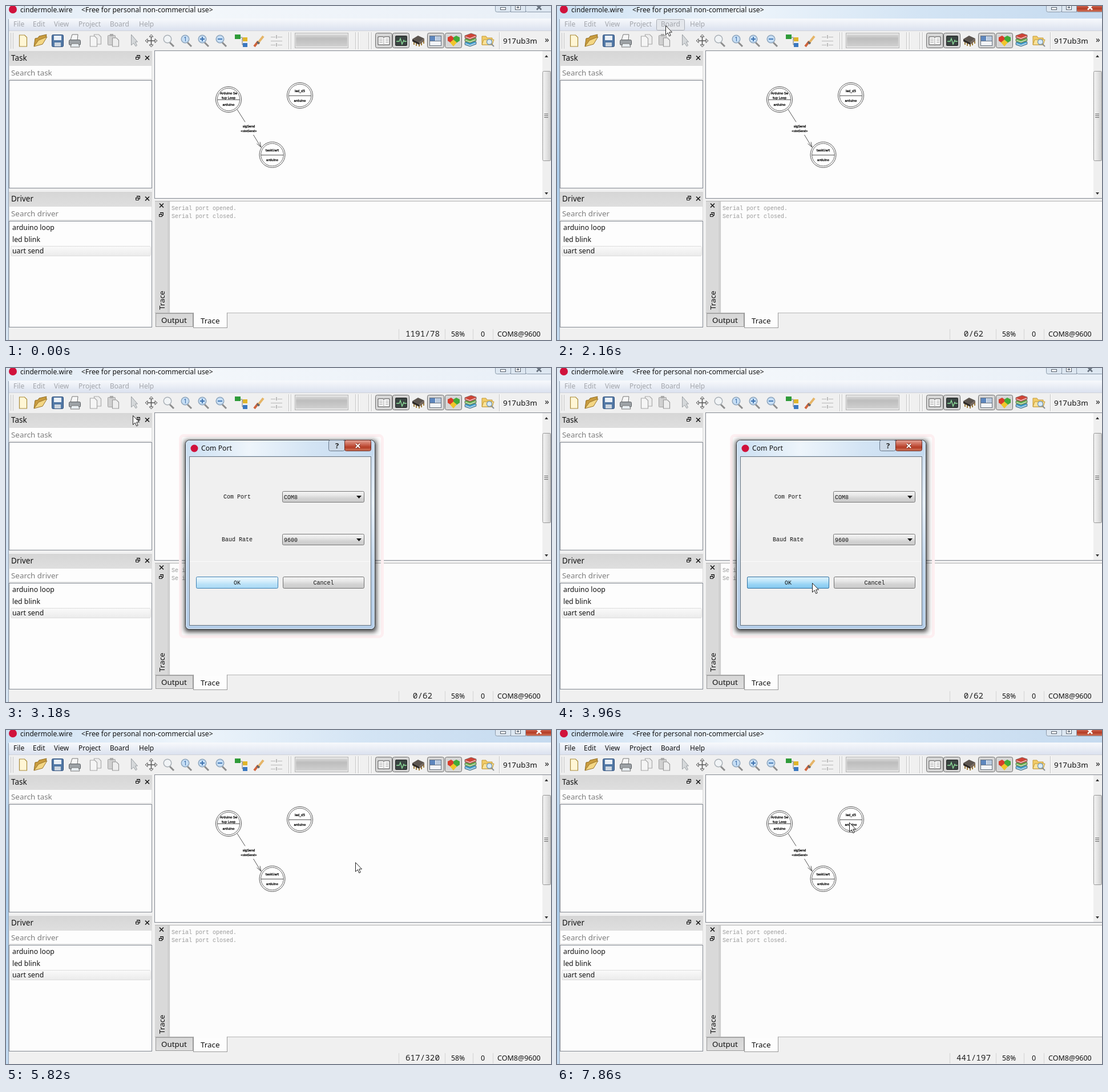
Recreate the animation shown at these times as an HTML page. Size 955 by 586 pixels, loop 8000 ms.

```html
<!DOCTYPE html>
<html lang="en">
<head>
<meta charset="utf-8">
<title>Wiring editor</title>
<style>
html, body { margin: 0; width: 100%; height: 100%; overflow: hidden; background: #f0f0f0; }
svg { display: block; }
text { font-family: "Noto Sans", "Open Sans", sans-serif; white-space: pre; }
.mono { font-family: "Liberation Mono", monospace; }
.tiny { font-family: "DejaVu Sans", sans-serif; stroke: #000; stroke-width: .3px; }
.wide { font-family: "Noto Sans Mono", monospace; }
</style>
</head>
<body>
<svg id="stage" width="955" height="586" viewBox="0 0 955 586"></svg>
<script>
const rect = (x, y, w, h, fill, stroke = 'none', rx = 0) => stroke === 'none'
  ? `<rect x="${x}" y="${y}" width="${w}" height="${h}" fill="${fill}" rx="${rx}"/>`
  : `<rect x="${x + .5}" y="${y + .5}" width="${w - 1}" height="${h - 1}" fill="${fill}" stroke="${stroke}" rx="${rx}"/>`;
const path = (d, stroke = '#333', width = 1, fill = 'none') =>
  `<path d="${d}" fill="${fill}" stroke="${stroke}" stroke-width="${width}"/>`;
const fill = (d, color) => path(d, 'none', 0, color);
const disc = (x, y, r, color, stroke = 'none', width = 1) =>
  `<circle cx="${x}" cy="${y}" r="${r}" fill="${color}" stroke="${stroke}" stroke-width="${width}"/>`;
const text = (x, y, s, size = 12, color = '#111', more = '') =>
  `<text x="${x}" y="${y}" font-size="${size}" fill="${color}" ${more}>${s.replace(/</g, '&lt;')}</text>`;
const group = (id, body, more = '') => `<g id="${id}" ${more}>${body}</g>`;
const shadow = (x, y, w, h, blur, opacity) =>
  `<rect x="${x}" y="${y}" width="${w}" height="${h}" rx="4" opacity="${opacity}" style="filter:blur(${blur}px)"/>`;
const grad = (id, colors, across) =>
  `<linearGradient id="${id}" x2="${across ? 1 : 0}" y2="${across ? 0 : 1}">` +
  colors.map((c, i) => `<stop offset="${i / (colors.length - 1)}" stop-color="${c}"/>`).join('') + '</linearGradient>';
const mid = 'text-anchor="middle"';
const mono = 'class="mono"';

const defs = '<defs>' +
  grad('glass', ['#dfeaf5', '#f3f7fb', '#eef3f9', '#e8eff7'], true) +
  grad('liveGlass', ['#cbdff2', '#eef5fb', '#d3e4f4', '#c5daef'], true) +
  grad('side', ['#dfe9f4', '#d0e0f0', '#d6e4f2']) +
  grad('liveSide', ['#cfe2f4', '#aacbea', '#c3daf0']) +
  grad('bar', ['#f7f9fc', '#e9edf5', '#d9e0ee']) +
  grad('head', ['#d6d6d6', '#dedede']) +
  grad('btn', ['#f4f4f4', '#e9e9e9', '#d2d2d2', '#cbcbcb']) +
  grad('blue', ['#eef8fe', '#d9f0fc', '#b9e1f8', '#aad9f4']) +
  grad('hot', ['#dcf1fc', '#c2e7fa', '#98d4f5', '#84c7ee']) +
  grad('red', ['#e3a497', '#d0705e', '#b53c25', '#cf7a60']) +
  grad('gauge', ['#d8d8d8', '#bdbdbd', '#c6c6c6', '#d0d0d0']) +
  grad('row', ['#fafafa', '#ebebeb']) +
  grad('thumb', ['#f4f4f4', '#e3e3e3', '#cdcdcd'], true) +
  grad('frame', ['#c7d9ec', '#e6eff8', '#bfd4ea', '#b4cde8']) + '</defs>';

const floatIcon = (x, y) => path(`M${x + 2.5} ${y + 2}v-1.500h5v5h-2M${x + .5} ${y + 3.5}h5v4h-5zM${x} ${y + 4}h6M${x + 2} ${y + 1}h6`, '#111');
const cross = (x, y, r = 3.5, color = '#111', w = 1.5) =>
  path(`M${x - r} ${y - r}l${2 * r} ${2 * r}M${x + r} ${y - r}l${-2 * r} ${2 * r}`, color, w);
const arrowDown = (x, y, up) => fill(`M${x - 3} ${y}h6l-3 ${up ? -4 : 4}z`, '#333');

// Toolbar icons
const page = (x, y, w, h, color, edge) => path(`M${x} ${y}h${w - 4}l4 4v${h - 4}h${-w}z`, edge, 1.2, color);
const lens = (x, mark) => path(`M${x + 12} 64l7 7`, '#8d8d8d', 3) +
  disc(x + 8, 58, 6.8, mark ? '#c6def5' : '#f1f4f6', mark ? '#8fa6bd' : '#a9b0b6', 1.5) +
  (mark === '1' ? text(x + 8, 62, '1', 10, '#235a9c', mid) : mark ? path(mark, '#3c71ae', 1.8) : '');
const folder = (x, y, s) => `<g transform="translate(${x} ${y}) scale(${s})">` +
  path('M1 17V2h7l2 3h9v12z', '#c49a36', 1, '#f2cc68') + path('M1 17l3-9h18l-3 9z', '#c49a36', 1, '#fae39a') + '</g>';
const foundFolder = (x, y, s) => folder(x, y, s) + disc(x + 14 * s, y + 12 * s, 4.5 * s, '#d7ebfa', '#7896ac', 1.4) +
  path(`M${x + 17 * s} ${y + 15 * s}l${5 * s} ${5 * s}`, '#8a8f92', 2);
const pressed = x => rect(x, 47, 30, 27, '#d6d6d6', '#6c6c6c', 3);
const split = x => path(`M${x + .5} 46v30`, '#c3c3c3') + path(`M${x + 1.500} 46v30`, '#fff');
const books = ['#3c9bd0', '#62ac48', '#cf4437'].map((c, i) => {
  const y = 64 - i * 6;
  return path(`M804 ${y}l11-4 9 3v4l-11 4-9-3z`, '#666', .7, c) + path(`M805 ${y + 2}l8 3 10-4`, '#eee', 1.2);
}).join('');

const toolbar = rect(5, 44, 950, 34, '#f0f0f0') + path('M5 43.500H955', '#d0d3da') +
  path('M8.500 47v28M12.500 47v28', '#c9c9c9', 1) +
  page(23.5, 51, 13, 20, '#fff6d5', '#a98b3a') +
  path('M49 71l2-14 5-1 2-3 13-3-1 5z', '#8e6b22', 1, '#c99c3f') + path('M49 71l8-11 15-6-8 13z', '#9a752a', 1, '#f3d684') +
  rect(80, 50, 21, 22, '#5278a5', '#2f4f7c', 2) + rect(84, 52, 13, 8, '#e9eff6') + rect(85, 64, 11, 7, '#cdd6e0') +
  path('M113 60l3-10h10l-1 10', '#777', 1, '#f7f7f7') + rect(110, 59, 21, 10, '#9da2a6', '#595d61', 2) +
  path('M113 72l2-6h12l2 6z', '#777', 1, '#e8eef2') +
  page(154.5, 50, 12, 17, '#eee', '#aaa') + page(147.5, 53, 12, 18, '#f5f5f5', '#a6a6a6') +
  rect(178, 51, 14, 18, '#d0d0d0', '#a0a0a0', 1) + rect(182, 49, 6, 4, '#aaa') + page(186.5, 56, 11, 15, '#eee', '#999') +
  path('M219.500 50v19l4-4 4 6 2-2-3-6h4z', '#9a9fa3', 1, '#d5d8da') +
  path('M254.500 53v16M246 61h17', '#555', 1.5) +
  path('M251 54l3.500-4 3.500 4zM251 68l3.500 4 3.500-4zM248 57.500l-4 3.500 4 3.500zM261 57.500l4 3.500-4 3.500z', '#555', 1, '#eee') +
  lens(275) + lens(306, '1') + lens(336, 'M340 58h8M344 54v8') + lens(367, 'M371 58h8') +
  path('M410 55h4v13h4M414 58h4', '#777') + rect(401, 50, 10, 8, '#2f9b39') + rect(415, 55, 8, 7, '#e0b52a') + rect(415, 65, 8, 7, '#3b78c0') +
  path('M435 71l7-9', '#d0643b', 4) + path('M440 63l4 3', '#666', 4) + path('M443 63l8-10', '#e5b568', 4) +
  path('M464 54.500h8M476 54.500h8M464 61.500h20M464 68.500h8M476 68.500h8', '#b8b8b8') + path('M474 51v6M474 65v6', '#bbb', 2) +
  split(495) + split(499) + rect(506, 47, 94, 27, '#e8e8e8', '#b3b3b3') + rect(508, 50, 90, 21, 'url(#gauge)') +
  [612, 617, 635, 640].map(split).join('') +
  pressed(647) + path('M652 54h9l1 1 1-1h9v14h-9l-1 1-1-1h-9z', '#444', 1, '#fff') + path('M662 55v14M654 58h6M654 61h6M654 64h6M665 58h5M665 61h5M665 64h5', '#999') +
  pressed(677) + rect(682, 52, 21, 18, '#3a4442', '#222', 1) + path('M684 62h5l2-5 3 10 3-7 1 2h4', '#8fe09c', 1.3) +
  path('M715 63v5M719 65v5M724 66v5M728 64v5M732 61v5', '#9c7b3a', 2) + fill('M712 58l10-6 11 5-9 7z', '#5c554f') + fill('M712 58l12 6v4l-12-6z', '#2f2a27') + fill('M724 64l9-7v4l-9 7z', '#75665a') +
  pressed(738) + rect(742, 52, 21, 18, '#f2f4f7', '#687381') + rect(743, 53, 9, 8, '#5d86bd') + rect(753, 53, 9, 8, '#b9c9dd') + path('M742 61.500h21', '#687381') +
  pressed(769) + fill('M774 55l6-3 4 3v8l-4 2-6-4z', '#d83d2b') + fill('M784 55l5-3 6 3v6l-6 4-5-2z', '#42aa3a') + fill('M778 64l6-5 6 5-6 7z', '#f0c52c') +
  books + foundFolder(833, 51, 1) + split(864) + text(871, 66, '917ub3m', 13.4) + text(944, 64, '»', 15);

// Dock panels
const dock = (y, name, bottom) => rect(5, y, 251, 25, 'url(#head)') + text(9, y + 17, name, 13.5) +
  floatIcon(227, y + 7) + cross(247.5, y + 12) +
  rect(5, y + 25, 251, 25, '#fdfdfd', '#dcdcdc') + text(9, y + 43, 'Search ' + name.toLowerCase(), 13.4, '#7d7d7d') +
  rect(5, y + 51, 251, bottom - y - 51, '#fdfdfd', '#828790');

const label = (x, y, s, size = 5.5) => text(x, y, s, size, '#000', `class="tiny" ${mid}`);
const node = (x, y, lines) => disc(x, y, 22.5, '#fff', '#555') + disc(x, y, 19.8, '#fff', '#666') +
  path(`M${x - 19.5} ${y + .5}h39`, '#555') +
  lines.map((s, i) => label(x, y + (lines.length > 1 ? -9 + i * 8 : -6), s)).join('') + label(x, y + 10.500, 'arduino');

const scene = rect(260, 78, 695, 260, '#fdfdfd', '#828790') + rect(940, 79, 15, 258, '#efefef') +
  rect(940, 114, 15, 158, 'url(#thumb)', '#979797', 2) + path('M943 189.500h7M943 192.500h7M943 195.500h7', '#666') +
  arrowDown(947, 90, true) + arrowDown(947, 327) +
  path('M405 181.500l14 22M433.500 226l13 21.500M439.500 241.500l7.500 6.500-2-9.500', '#555') +
  label(425.500, 213, 'sigSend') + label(425.500, 221, '<slotSend>', 4.8) +
  node(390, 164, ['Arduino Se', 'tup Loop']) + node(515, 157, ['led_d5']) + node(466.500, 261, ['taskUart']);

const trace = rect(261, 342, 23, 196, '#d9d9d9') + cross(272.5, 350) + floatIcon(268, 362) +
  text(0, 0, 'Trace', 13.3, '#111', 'transform="translate(278 533) rotate(-90)"') +
  rect(286, 342, 669, 196, '#fcfcfc') + path('M261 342.500H955M284.500 342v196M286.500 538V342M261 538.500H955', '#b5b5b5') +
  text(290, 358, 'Serial port opened.', 10, '#999', mono) + text(290, 372, 'Serial port closed.', 10, '#999', mono) +
  rect(262, 539, 66, 24, 'url(#head)', '#999') + text(272, 556, 'Output', 13.4) +
  rect(328, 538, 60, 27, '#fdfdfd', '#999') + rect(329, 537, 58, 3, '#fcfcfc') + text(341, 557, 'Trace', 13.4);

const status = [688, 769, 818, 853].map(x => path(`M${x}.5 567v18`, '#d4d4d4')).join('') +
  text(730, 580, '', 14.3, '#222', `id="pos" class="wide" ${mid}`) + text(780, 580, '58%', 12.2) +
  text(832, 580, '0', 12.5) + text(861, 580, 'COM8@9600', 12.5);

const menus = [['File', 13], ['Edit', 47], ['View', 84], ['Project', 127], ['Board', 182], ['Help', 233]];
const chrome = (id, glass, side, close, ink) => group(id,
  rect(0, 0, 955, 23, `url(#${glass})`) + rect(0, 0, 4, 586, `url(#${side})`) +
  rect(857, -8, 28, 19, '#dde7f1', '#8b99aa', 3) + rect(884, -8, 27, 19, '#dde7f1', '#8b99aa') +
  rect(910, -8, 48, 19, close, '#8b99aa', 3) + rect(866, 2, 10, 5, '#fff', '#56606d') +
  rect(892, -3, 10, 10, '#fff', '#56606d') + rect(895, 1, 4, 3, '#d8e2ec', '#56606d') + cross(934, 2.5, 4, ink, 2.6));
const hoverBox = (id, x, w, paint, edge) => group(id, rect(x, 23, w, 20, paint, edge, 2));

const win = rect(0, 0, 955, 586, '#f0f0f0') +
  chrome('idle', 'glass', 'side', '#dde7f1', '#69737f') + chrome('live', 'liveGlass', 'liveSide', 'url(#red)', '#fff') +
  path('M4.500 23v563', '#8f9eb0') +
  disc(12, 6, 7, '#d0123c') + text(25, 11, 'cindermole.wire', 12.1) + text(132, 11, '<Free for personal non-commercial use>', 12.15) +
  rect(5, 22, 950, 22, 'url(#bar)') +
  hoverBox('overProject', 120, 53, '#e4e7ec', '#a9adb5') + hoverBox('overBoard', 174, 50, '#e4e7ec', '#a9adb5') +
  hoverBox('downBoard', 174, 50, '#cfd2d8', '#6f7378') +
  group('names', menus.map(([s, x]) => `<text x="${x}" y="36" font-size="12">${s}</text>`).join('')) +
  toolbar + dock(79, 'Task', 320) + dock(326, 'Driver', 564) +
  rect(8, 421, 246, 18, 'url(#row)', '#dcdcdc', 2) +
  ['arduino loop', 'led blink', 'uart send'].map((s, i) => text(11, 393 + i * 20.500, s, 12.3)).join('') +
  scene + trace + status;

const redBox = (y, d) => rect(180, y, 15, 15, '#fff', '#e06060') + path(d, '#dc2222', 2);
const menu = group('menu', shadow(178, 48, 170, 124, 1.2, .45) +
  rect(174, 44, 172, 126, '#f2f2f2', '#8f8f8f') + path('M203.500 47v120', '#e8e8e8') +
  group('pick', rect(177, 68, 165, 22, '#e6f0fa', '#aecbe8', 2)) +
  fill('M181 72h13l-5 7v7l-3-2v-5z', '#9c9c9c') +
  redBox(103, 'M183 110.500h8M188 107l4 3.500-4 3.500') + redBox(126, 'M187.500 138v-8M184 133l3.500-4 3.500 4') + foundFolder(180, 148, .7) +
  [['Board Setting...', 61], ['Trace port...', 84], ['Build', 115], ['Upload', 137], ['Explore Source ...', 160]]
    .map(([s, y]) => text(209, y, s, 12.25)).join(''));

const combo = (y, name, value, x) => text(x, y + 13, name, 10, '#111', mono) +
  rect(484, y, 144, 20, 'url(#btn)', '#777', 2) + text(487, y + 13.500, value, 10, '#111', mono) + fill(`M614 ${y + 8}h9l-4.500 5z`, '#111');
const button = (x, w, s, paint, edge) => rect(x, 366, w, 21, paint, edge, 2) + text(x + w / 2, 380, s, 10, '#111', `${mono} ${mid}`);
const dialog = group('dialog', rect(305, 118, 355, 354, 'none', '#fdeff1', 6).replace('/>', ' stroke-width="5"/>') +
  shadow(313, 127, 336, 336, 4, .75) +
  rect(314, 126, 333, 333, 'url(#frame)', '#2c3238', 7) + rect(315, 127, 331, 331, 'none', '#eaf3fb', 6) +
  rect(316, 128, 329, 26, 'url(#liveGlass)', 'none', 5) +
  disc(330, 141, 6.5, '#d0123c') + text(342, 145, 'Com Port', 12.2) +
  rect(565, 126, 29, 20, '#ccd9e7', '#68788a', 3) + text(580, 141, '?', 13, '#222', `${mid} font-weight="bold"`) +
  rect(593, 126, 47, 20, 'url(#red)', '#6b2a22', 3) + cross(616.500, 136.500, 3.5, '#7c2b1e', 4) + cross(616.500, 136.500, 3.5, '#fff', 2.2) +
  rect(321, 155, 319, 297, '#f0f0f0', '#66737f') + path('M322 339.500H639', '#fafafa') +
  combo(216, 'Com Port', 'COM8', 381) + combo(291, 'Baud Rate', '9600', 378) +
  button(333, 144, 'OK', 'url(#blue)', '#3c7fb1') + group('hotOk', button(333, 144, 'OK', 'url(#hot)', '#2f6f9f')) +
  button(485, 143, 'Cancel', 'url(#btn)', '#707070'));

const stage = document.getElementById('stage');
stage.innerHTML = defs + win + menu + dialog +
  group('cursor', path('M.5 .5V16.500L4.200 13 6.700 18.800 9.200 17.700 6.700 12H11.500Z', '#222', 1, '#fff'));
const el = id => document.getElementById(id);
const show = (id, on) => { el(id).style.opacity = +on; };

const track = [
  [60, 928, 93], [120, 804, 89], [180, 561, 109], [240, 386, 116], [300, 306, 114], [360, 271, 99], [420, 261, 85],
  [480, 232, 70], [600, 185, 50], [720, 160, 41], [1020, 160, 41], [1200, 190, 34], [2220, 190, 34],
  [2580, 214, 70], [2880, 222, 83], [3180, 222, 83], [3240, 228, 95], [3480, 360, 300], [3660, 455, 374], [3780, 466, 379],
  [4020, 441, 376], [4500, 441, 376], [4620, 440, 375], [5460, 440, 375], [5520, 456, 368], [5580, 486, 352],
  [5640, 538, 301], [5700, 572, 264], [5760, 598, 239], [5820, 612, 232], [7440, 612, 232], [7560, 607, 231],
  [7620, 594, 227], [7680, 576, 217], [7740, 553, 193], [7800, 533, 184], [7860, 512, 162]
];
function pointer(t) {
  const i = track.findIndex(k => k[0] > t);
  if (i < 0) return track.at(-1).slice(1);
  if (i === 0) return track[0].slice(1);
  const a = track[i - 1], b = track[i], u = (t - a[0]) / (b[0] - a[0]);
  return [1, 2].map(k => Math.round(a[k] + (b[k] - a[k]) * u));
}
const ramp = (t, from, to) => Math.max(0, Math.min(1, (t - from) / (to - from)));

function draw(now) {
  const t = Math.floor(now % 8000 / 60) * 60;
  const [x, y] = pointer(t);
  const active = t >= 2160 && t < 3000 || t >= 5400;
  const lit = t >= 2220 && t < 3000 || t >= 5400;
  const open = t >= 2220 && t < 2940;
  const hover = t >= 60 && t < 2220 && y > 22 && y < 43;
  show('cursor', t >= 60);
  el('cursor').setAttribute('transform', `translate(${x} ${y})`);
  show('idle', !active);
  show('live', active);
  el('names').setAttribute('fill', lit ? '#111' : '#a2a5ab');
  show('overProject', hover && x >= 120 && x < 174);
  show('overBoard', hover && x >= 174 && x < 224);
  show('downBoard', open);
  show('menu', ramp(t, 2160, 2340) * (1 - ramp(t, 2820, 2940)));
  show('pick', y >= 68 && y < 90);
  show('dialog', ramp(t, 2940, 3120) * (1 - ramp(t, 5280, 5460)));
  show('hotOk', x >= 333 && x < 477 && y >= 366 && y < 387);
  el('pos').textContent = t < 60 ? '1191/78' : t > 420 && t < 5640 ? '0/62'
    : Math.round((x - 261) * 1.757) + '/' + Math.round((y - 50) * 1.757);
}
function loop() {
  draw(performance.now());
  requestAnimationFrame(loop);
}
loop();
</script>
</body>
</html>
```
